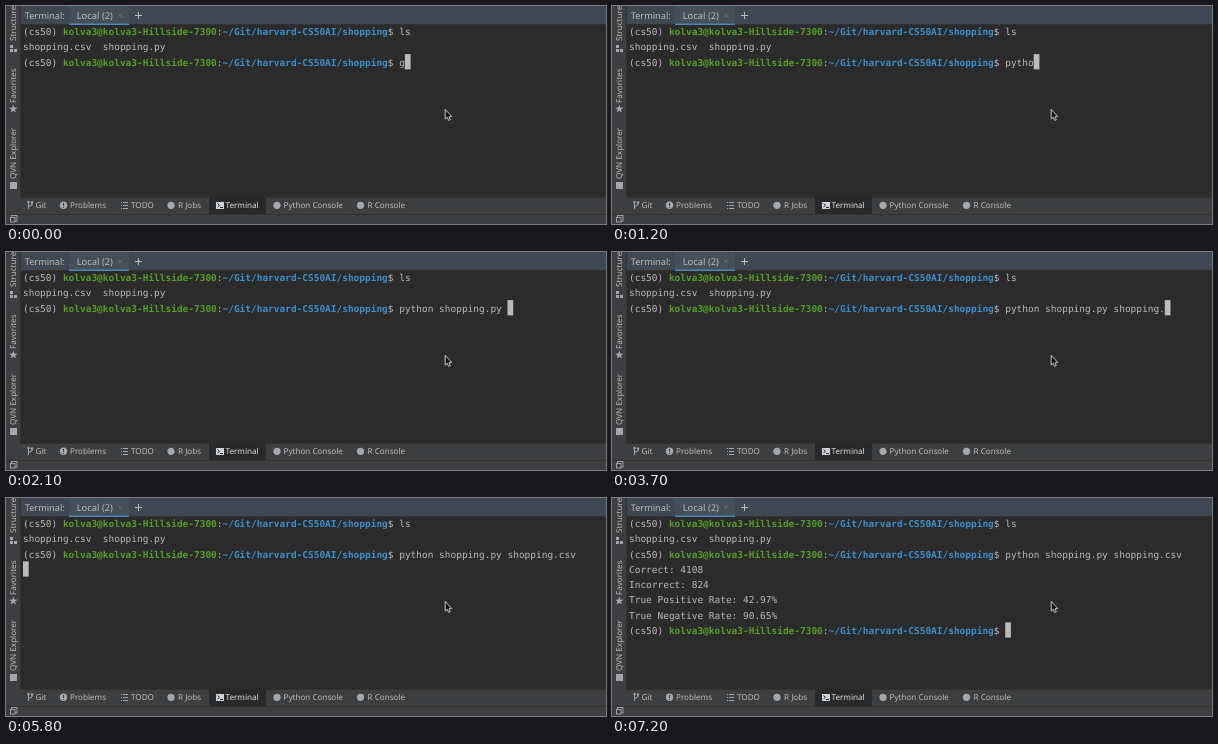
An HTML page with a canvas that plays this animation: 600x218 px, repeating every 8 s.

```html
<!DOCTYPE html>
<html lang="en">
<head>
<meta charset="utf-8">
<title>Terminal session</title>
<style>
  html, body { margin: 0; width: 600px; height: 218px; overflow: hidden; background: #2c2b2c; }
  canvas { display: block; }
</style>
</head>
<body>
<canvas id="stage" width="600" height="218"></canvas>
<script>
const ctx = document.getElementById('stage').getContext('2d');
const LOOP = 8000;
const LEFT = 17, TOP = 17.6, CELL = 5.7, LINE = 15.25;
const PANEL = '#3c3e40', TAB_BAR = '#3d4852', SCREEN = '#2c2b2c', EDGE = '#323232';
const TEXT = '#bbbbbb', ICON = '#a5a8aa', GREEN = '#559e27', BLUE = '#3b90cc';
const MONO = '9.47px "DejaVu Sans Mono", monospace';
const SANS = '"Noto Sans", sans-serif';

const PROMPT = [
  ['(cs50) ', TEXT],
  ['kolva3@kolva3-Hillside-7300', GREEN, true],
  [':', TEXT],
  ['~/Git/harvard-CS50AI/shopping', BLUE, true],
  ['$ ', TEXT]
];
const PROMPT_LENGTH = PROMPT.reduce((n, [s]) => n + s.length, 0);
const COMMAND = 'python shopping.py shopping.csv';
const OUTPUT = [
  'Correct: 4108',
  'Incorrect: 824',
  'True Positive Rate: 42.97%',
  'True Negative Rate: 90.65%'
];

// [start time, typed characters of the command]
const TYPING = [
  [100, 0], [600, 1], [1000, 2], [1100, 4], [1200, 5], [1400, 6], [1500, 7],
  [1900, 8], [2000, 9], [2100, 19], [3600, 20], [3700, 28],
  [4500, 29], [4600, 30], [4900, 31]
];
const CURSOR_OFF = [[3300, 3600], [5400, 5700], [6900, 7200]];
const ENTER = 5700, RESULT = 7100, NEW_PROMPT = 7200;

function rect(x, y, w, h, color) {
  ctx.fillStyle = color;
  ctx.fillRect(x, y, w, h);
}

function disc(x, y, r, color = ICON) {
  ctx.fillStyle = color;
  ctx.beginPath();
  ctx.arc(x, y, r, 0, Math.PI * 2);
  ctx.fill();
}

function trace(points, color = ICON, width = 1) {
  ctx.strokeStyle = color;
  ctx.lineWidth = width;
  ctx.beginPath();
  points.forEach(([x, y]) => ctx.lineTo(x, y));
  ctx.stroke();
}

function label(text, x, y, size = 8.1, color = TEXT) {
  ctx.font = `${size}px ${SANS}`;
  ctx.fillStyle = color;
  ctx.fillText(text, x, y);
}

function sideLabel(text, bottom) {
  ctx.save();
  ctx.translate(10.2, bottom);
  ctx.rotate(-Math.PI / 2);
  label(text, 0, 0);
  ctx.restore();
}

function print(text, column, row, color = TEXT, bold = false) {
  ctx.font = (bold ? 'bold ' : '') + MONO;
  ctx.fillStyle = color;
  [...text].forEach((c, i) =>
    ctx.fillText(c, LEFT + (column + i) * CELL, TOP + row * LINE + 11.4));
}

function printPrompt(row, command = '') {
  let column = 0;
  for (const [text, color, bold] of PROMPT) {
    print(text, column, row, color, bold);
    column += text.length;
  }
  print(command, column, row);
}

function block(column, row) {
  rect(LEFT + column * CELL, TOP + row * LINE, CELL, LINE, TEXT);
}

function drawSidebar() {
  rect(0, 0, 14, 218, PANEL);
  rect(14, 0, 1, 191, EDGE);
  sideLabel('Structure', 35);
  sideLabel('Favorites', 97);
  sideLabel('QVN Explorer', 173);

  rect(4, 39, 3, 3, ICON);
  rect(4, 43, 3, 3, ICON);
  rect(8, 43, 3, 3, ICON);

  ctx.fillStyle = ICON;
  ctx.beginPath();
  for (let i = 0; i < 10; i++) {
    const a = i * Math.PI / 5 - Math.PI / 2, r = i % 2 ? 1.8 : 4.4;
    ctx.lineTo(7.3 + r * Math.cos(a), 103 + r * Math.sin(a));
  }
  ctx.fill();

  rect(4, 176, 7, 7, ICON);
}

function drawTabs() {
  rect(14, 0, 586, 18, TAB_BAR);
  rect(63, 0, 60, 18, '#434f59');
  rect(14, 18, 586, 1, EDGE);
  rect(63, 17.5, 60, 1.5, '#4f86b4');
  label('Terminal:', 18.7, 12.6, 9.2);
  label('Local (2)', 70.7, 12.6, 9.4);
  trace([[112, 7.5], [116, 11.5]], '#787b7d', 0.8);
  trace([[116, 7.5], [112, 11.5]], '#787b7d', 0.8);
  trace([[129, 9.5], [136, 9.5]], TEXT);
  trace([[132.5, 6], [132.5, 13]], TEXT);
}

function drawToolbar() {
  rect(0, 191, 600, 27, PANEL);
  rect(14, 191, 586, 1, EDGE);
  rect(203, 191, 57, 17, '#28292b');
  rect(0, 208, 600, 1, EDGE);
  const labels = [
    ['Git', 29.5], ['Problems', 64], ['TODO', 125], ['R Jobs', 172],
    ['Terminal', 219.5, '#e0e0e0'], ['Python Console', 277.5], ['R Console', 361.5]
  ];
  labels.forEach(([text, x, color]) => label(text, x, 202.2, 8.1, color));

  trace([[22.5, 195], [22.5, 203]]);
  trace([[22.5, 200.5], [26, 199], [26, 196]]);
  disc(22.5, 196, 1.2);
  disc(26, 196.5, 1.2);

  disc(57.5, 199.3, 3.7);
  rect(57, 197, 1, 3, PANEL);
  rect(57, 201, 1, 1, PANEL);

  for (const y of [196, 199, 202]) {
    rect(115, y, 1, 1, ICON);
    rect(117, y, 5, 1, ICON);
  }

  disc(165, 199.3, 3.6);
  rect(210, 196, 8, 7, '#d0d2d3');
  trace([[211.5, 197.5], [213.5, 199.3], [211.5, 201]], '#28292b');
  rect(214, 201, 3, 1, '#28292b');
  disc(271, 199.3, 3.6);
  disc(354.5, 199.3, 3.6);

  ctx.strokeStyle = ICON;
  ctx.lineWidth = 0.9;
  ctx.strokeRect(5.5, 209.5, 5.5, 5.5);
  rect(4, 211, 5, 5, PANEL);
  ctx.strokeRect(4.5, 211.5, 4.5, 4.5);
}

function drawPointer() {
  const outline = [[439.2, 103.4], [439.2, 113], [441.3, 111.3], [442.6, 114.4],
    [444.3, 113.7], [443, 110.8], [445.7, 110.4]];
  ctx.beginPath();
  outline.forEach(([x, y]) => ctx.lineTo(x, y));
  ctx.closePath();
  ctx.fillStyle = '#111';
  ctx.fill();
  ctx.strokeStyle = '#d8d8d8';
  ctx.lineWidth = 0.9;
  ctx.stroke();
}

function drawSession(t) {
  const step = TYPING.filter(([start]) => t >= start).pop();
  const command = step ? COMMAND.slice(0, step[1]) : 'g';
  printPrompt(0, 'ls');
  print('shopping.csv  shopping.py', 0, 1);
  printPrompt(2, command);
  if (t >= RESULT) OUTPUT.forEach((line, i) => print(line, 0, 3 + i));
  if (t >= NEW_PROMPT) printPrompt(7);

  if (CURSOR_OFF.some(([from, to]) => t >= from && t < to)) return;
  if (t >= NEW_PROMPT) block(PROMPT_LENGTH, 7);
  else if (t >= ENTER) block(0, 3);
  else block(PROMPT_LENGTH + command.length, 2);
}

function draw(t) {
  rect(0, 0, 600, 218, SCREEN);
  drawTabs();
  drawSidebar();
  drawToolbar();
  drawSession(t);
  drawPointer();
}

ctx.textRendering = 'geometricPrecision';
const begin = performance.now();
function tick() {
  draw((performance.now() - begin) % LOOP);
  requestAnimationFrame(tick);
}
tick();
</script>
</body>
</html>
```
